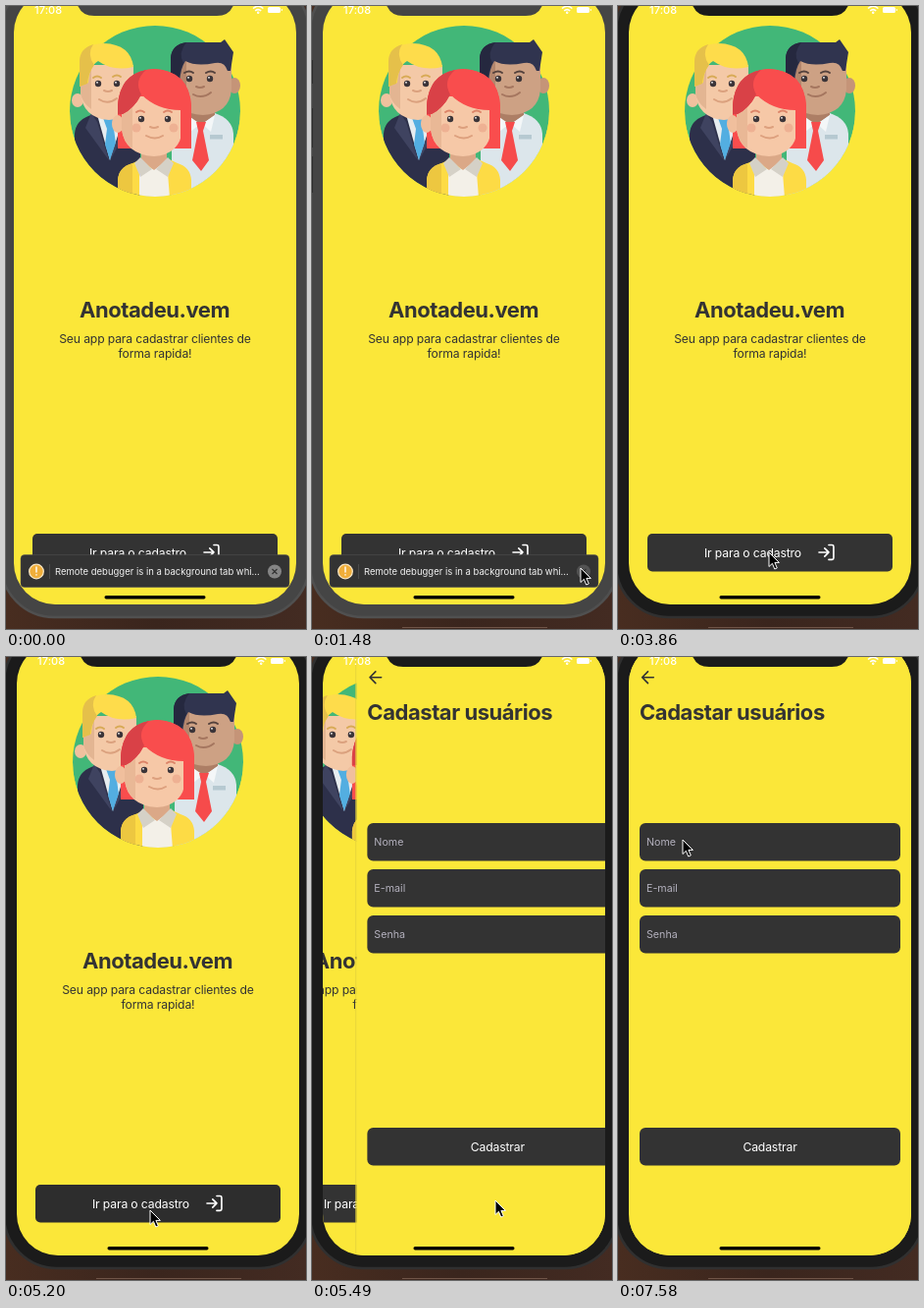
These frames come from a looping animation (306x634 px, 8 s). An HTML page:

```html
<!DOCTYPE html>
<html lang="pt">
<head>
<meta charset="utf-8">
<title>Cadastro de clientes</title>
<style>
  html, body { margin: 0; width: 100%; height: 100%; overflow: hidden; background: #42291f; }
  svg { display: block; }
  text { font: 12.2px Inter, "Liberation Sans", sans-serif; letter-spacing: -.15px; fill: #333; }
  .title { font-size: 22px; font-weight: 700; letter-spacing: -.45px; }
  .mid { text-anchor: middle; }
  .light { fill: #fff; }
  .hint { font-size: 10.7px; letter-spacing: 0; fill: #b3b0bd; }
  .small { font-size: 9.5px; letter-spacing: 0; fill: #f2f2f2; }
  .clock { font-size: 11px; font-weight: 500; letter-spacing: .1px; fill: #fff; }
  .line { fill: none; stroke-width: 2; stroke-linecap: round; stroke-linejoin: round; }
  .box { fill: #333; }
</style>
</head>
<body>
<svg width="306" height="634" viewBox="0 0 306 634">
  <defs>
    <linearGradient id="wood" x2="1"><stop stop-color="#482d20"/><stop offset=".5" stop-color="#3a251d"/><stop offset="1" stop-color="#432b22"/></linearGradient>
    <clipPath id="glass"><rect x="11" y="-15" width="288" height="624" rx="42"/></clipPath>
    <clipPath id="badge"><path d="M60 20H250V107H242A87 87 0 0 1 68 107H60z"/></clipPath>
    <g id="eyes"><circle r="3.2" fill="#3c3539"/><circle cx="-1" cy="-1.2" r=".9" fill="#fff"/></g>
  </defs>
  <rect width="306" height="634" fill="url(#wood)"/>
  <path id="edge" d="M92 632.5H240" stroke="#705548"/>

  <g id="phone">
    <rect id="body" x="-2" y="-28" width="314" height="650" rx="54" stroke-width="2.5"/>
    <path id="keys" d="M0 55V79M0 104V144M0 153V190" stroke="#2c2c2c" stroke-width="2"/>
    <g clip-path="url(#glass)">
      <rect x="11" y="-15" width="288" height="624" fill="#fbe739"/>

      <g id="home">
        <g clip-path="url(#badge)">
          <circle cx="155" cy="107" r="87" fill="#42b778"/>

          <!-- blond man -->
          <ellipse cx="76" cy="96" rx="6" ry="7" fill="#f0c19e"/>
          <path d="M73 195V130Q74 117 87 112L102 106H124L140 114V195z" fill="#2d304a"/>
          <path d="M95 107L109 157L125 107z" fill="#e7edf0"/>
          <path d="M102 114H115L113 125L115 140L109 157L104 141L106 125z" fill="#53aee1"/>
          <path d="M90 109L84 124L108 157L96 118zM125 109L129 122L109 157L122 119z" fill="#3f4360"/>
          <path d="M79 60H133V88Q132 114 108 116Q81 114 79 88z" fill="#f4c9a7"/>
          <path d="M79 60H90V105Q80 98 79 88z" fill="#e3b592"/>
          <path d="M78 82V57Q78 39 103 38Q130 39 133 62Q112 67 97 56Q88 61 87 78z" fill="#fedc4b"/>
          <path d="M78 82V57Q78 43 92 39Q85 49 93 60Q87 68 86 79z" fill="#e5c04a"/>
          <path d="M92 73q4-3 8 0M112 72q4-3 8 0" class="line" stroke="#d8aa55"/>
          <use href="#eyes" x="97" y="79"/><use href="#eyes" x="116" y="79"/>
          <path d="M103 86q4 2 8 0M98 95q9 6 18-1" class="line" stroke="#dba17e"/>

          <!-- dark-haired man -->
          <ellipse cx="236" cy="81" rx="6" ry="8" fill="#c59478"/>
          <path d="M172 195V118L190 109H216Q234 115 235 130V195z" fill="#dce6eb"/>
          <path d="M188 98H216V111L202 121L188 113z" fill="#ad7e65"/>
          <path d="M172 55H233V85Q231 109 204 111Q174 109 172 85z" fill="#cda184"/>
          <path d="M172 55H187V103Q173 98 172 85z" fill="#b3866d"/>
          <path d="M171 84V53Q172 39 187 37H222L226 34L235 47L232 66H229Q226 56 216 58Q197 62 186 56Q181 63 180 78z" fill="#30344f"/>
          <path d="M171 84V53Q172 39 187 37Q178 48 184 58Q179 67 179 80z" fill="#25283f"/>
          <path d="M185 68q5-3 9 0M207 68q5-3 9 0" class="line" stroke="#55423d"/>
          <use href="#eyes" x="190" y="74"/><use href="#eyes" x="211" y="74"/>
          <path d="M197 82q4 2 8 0M194 90q9 5 18-2" class="line" stroke="#a5765f"/>
          <path d="M188 111L201 120L191 128zM216 111L203 120L212 128z" fill="#f4f7f8"/>
          <path d="M197 118H207L204 127L210 157L202 168L193 157L199 127z" fill="#f64b4b"/>
          <rect x="211" y="131" width="13" height="4.5" fill="#b6c9d1"/>

          <!-- red-haired woman -->
          <path d="M117 145V101Q120 66 154 64Q190 66 192 102V145z" fill="#f94d4d"/>
          <path d="M117 195V177Q118 164 132 160L145 154H165L178 160Q191 164 192 177V195z" fill="#fddb45"/>
          <path d="M117 195V177Q118 164 132 160V195z" fill="#edc740"/>
          <path d="M139 158L153 166L167 157L170 195H139z" fill="#f3f0e8"/>
          <path d="M141 144H167V157L154 167L141 157z" fill="#dba887"/>
          <path d="M140 154L152 166L140 174L134 160zM168 154L156 166L168 174L174 160z" fill="#d5d1c7"/>
          <ellipse cx="117" cy="120" rx="6" ry="9" fill="#f0bf9d"/>
          <path d="M121 92H183V125Q181 151 154 153Q124 151 121 125z" fill="#f6c8a7"/>
          <path d="M121 92H132V145Q122 138 121 125z" fill="#e9b896"/>
          <path d="M117 110V101Q120 66 154 64Q190 66 192 102V145H181V106Q157 106 141 90Q134 104 122 110z" fill="#f94d4d"/>
          <path d="M117 110V101Q119 70 146 65Q133 76 141 90Q134 104 122 110z" fill="#d94147"/>
          <circle cx="136" cy="124" r="4.5" fill="#eeb193"/><circle cx="174" cy="124" r="4.5" fill="#eeb193"/>
          <path d="M136 108q4-3 8 0M164 108q4-3 8 0" class="line" stroke="#dc8468"/>
          <use href="#eyes" x="141" y="115"/><use href="#eyes" x="168" y="115"/>
          <path d="M150 123q4 2 8 0M146 132q9 5 17 0" class="line" stroke="#dda07e"/>
        </g>
        <text class="title mid" x="154.5" y="317">Anotadeu.vem</text>
        <text class="mid" x="155" y="342.5">Seu app para cadastrar clientes de</text>
        <text class="mid" x="155" y="357.5">forma rapida!</text>
        <rect id="enter" class="box" x="30" y="537" width="250" height="38.5" rx="5"/>
        <text class="light" x="88" y="560.5">Ir para o cadastro</text>
        <path class="line" stroke="#fff" transform="translate(202.5 546) scale(.83)" d="M15 3h4a2 2 0 0 1 2 2v14a2 2 0 0 1-2 2h-4M10 17l5-5-5-5M15 12H3"/>
      </g>

      <g id="form">
        <rect x="10" y="-15" width="1" height="624" fill="#e2d23c"/>
        <rect x="11" y="-15" width="288" height="624" fill="#fbe739"/>
        <path class="line" stroke="#333" transform="translate(20.5 10.8) scale(.83)" d="M19 12H5M12 19l-7-7 7-7"/>
        <text class="title" x="22" y="64">Cadastar usuários</text>
        <rect class="box" x="22" y="169" width="266" height="38.5" rx="6"/>
        <rect class="box" x="22" y="216" width="266" height="38.5" rx="6"/>
        <rect class="box" x="22" y="263" width="266" height="38.5" rx="6"/>
        <text class="hint" x="29" y="191.5">Nome</text>
        <text class="hint" x="29" y="238.5">E-mail</text>
        <text class="hint" x="29" y="285.5">Senha</text>
        <rect id="caret" x="29" y="180" width="1.5" height="15" fill="#4272ee"/>
        <rect class="box" x="22" y="479" width="266" height="38.5" rx="6"/>
        <text class="light mid" x="155" y="502.7">Cadastrar</text>
      </g>

      <g id="toast">
        <rect x="18" y="558.5" width="274" height="33" rx="4" fill="#333" stroke="#555" stroke-width=".5"/>
        <circle cx="34" cy="575.5" r="7.3" fill="#f0ae3a" stroke="#f7e6c5" stroke-width="1.3"/>
        <path d="M34 571v5M34 578.8v.2" class="line" stroke="#fff" style="stroke-width:1.4"/>
        <path d="M47.5 568V583" stroke="#4c4c4c"/>
        <text class="small" x="53" y="579">Remote debugger is in a background tab whi...</text>
        <g id="close">
          <circle cx="277" cy="575.5" r="7" fill="#858585"/>
          <path d="M274.5 573l5 5m0-5l-5 5" stroke="#333" stroke-width="1.2"/>
        </g>
      </g>

      <rect x="103.5" y="600" width="103" height="3.4" rx="1.7"/>
      <text class="clock" x="32" y="8">17:08</text>
      <g fill="none" stroke="#fff" stroke-width="1.5">
        <path d="M255 2.5q5.2-4.4 10.4 0M257.2 4.9q3-2.6 6 0"/>
        <circle cx="260.2" cy="6.8" r=".5"/>
      </g>
      <rect x="270" y="1" width="13" height="6" rx="1.6" fill="#fff"/>
      <path d="M284.3 3v2" stroke="#fff"/>
    </g>
    <path id="notch" d="M72 -1Q76 -1 77 1Q81 10 93 10H218Q230 10 234 1Q235 -1 239 -1z"/>
  </g>
  <path id="cursor" d="M0 0V14.5L3.4 11.3L5.8 17L8.3 15.9L5.9 10.4H10.4z" fill="#000" stroke="#fff"/>
</svg>
<script>
const LOOP = 8000, STEP = 148.4;
const $ = id => document.getElementById(id);

// pointer stops: time, x, y; the hand eases from one to the next
const stops = [
  [890, 310, 600], [1480, 274, 572], [1780, 274, 572], [2660, 155, 558],
  [3120, 155, 558], [3260, 155, 560], [3710, 155, 560], [4010, 152, 552], [4310, 146, 563],
  [4460, 146, 563], [4610, 147, 563], [5200, 147, 563], [5490, 187, 553],
  [6230, 64, 182], [6530, 66, 186]
];
const ease = k => k * k * (3 - 2 * k);

function pointer(t) {
  const i = stops.findIndex(s => s[0] > t);
  if (i < 1) return (i ? stops.at(-1) : stops[0]).slice(1);
  const a = stops[i - 1], b = stops[i], k = ease((t - a[0]) / (b[0] - a[0]));
  return [a[1] + (b[1] - a[1]) * k, a[2] + (b[2] - a[2]) * k];
}

const show = (id, on) => $(id).style.display = on ? '' : 'none';
const move = (id, x, y = 0) => $(id).setAttribute('transform', `translate(${x} ${y})`);
const paint = (id, fill, stroke = 'none') => {
  $(id).setAttribute('fill', fill);
  $(id).setAttribute('stroke', stroke);
};

function draw(now) {
  const t = Math.floor((now % LOOP + 8) / STEP) * STEP;
  const focused = t > 1600;
  const shade = focused ? '#1b1b1b' : '#454545';
  paint('body', shade, focused ? '#303030' : '#505050');
  paint('notch', shade);
  show('keys', !focused);

  // the view pans slightly before the pointer enters
  const pan = 1 - ease(Math.min(1, Math.max(0, (t - 445) / 297)));
  move('phone', -3 * pan);
  move('edge', 0, 3 * pan);
  show('toast', !focused);
  $('close').style.opacity = t > 1470 ? .4 : 1;

  // critically damped spring: stiffness 1000, mass 3
  const x = Math.max(0, t - 5290) / 1000 * Math.sqrt(1000 / 3);
  const left = (1 + x) * Math.exp(-x);
  move('home', -.3 * 288 * (1 - left));
  move('form', left < .003 ? 0 : 288 * left);
  show('form', x > 0);
  $('enter').style.fill = t > 5180 && t < 5300 ? '#2d2d2d' : '';
  $('caret').style.opacity = t < 6970 || t > 7550 ? 0 : t > 7410 ? .5 : 1;

  show('cursor', t > 1030);
  move('cursor', ...pointer(t).map(Math.round));
}

const start = performance.now();
(function tick() {
  draw(performance.now() - start);
  requestAnimationFrame(tick);
})();
</script>
</body>
</html>
```
